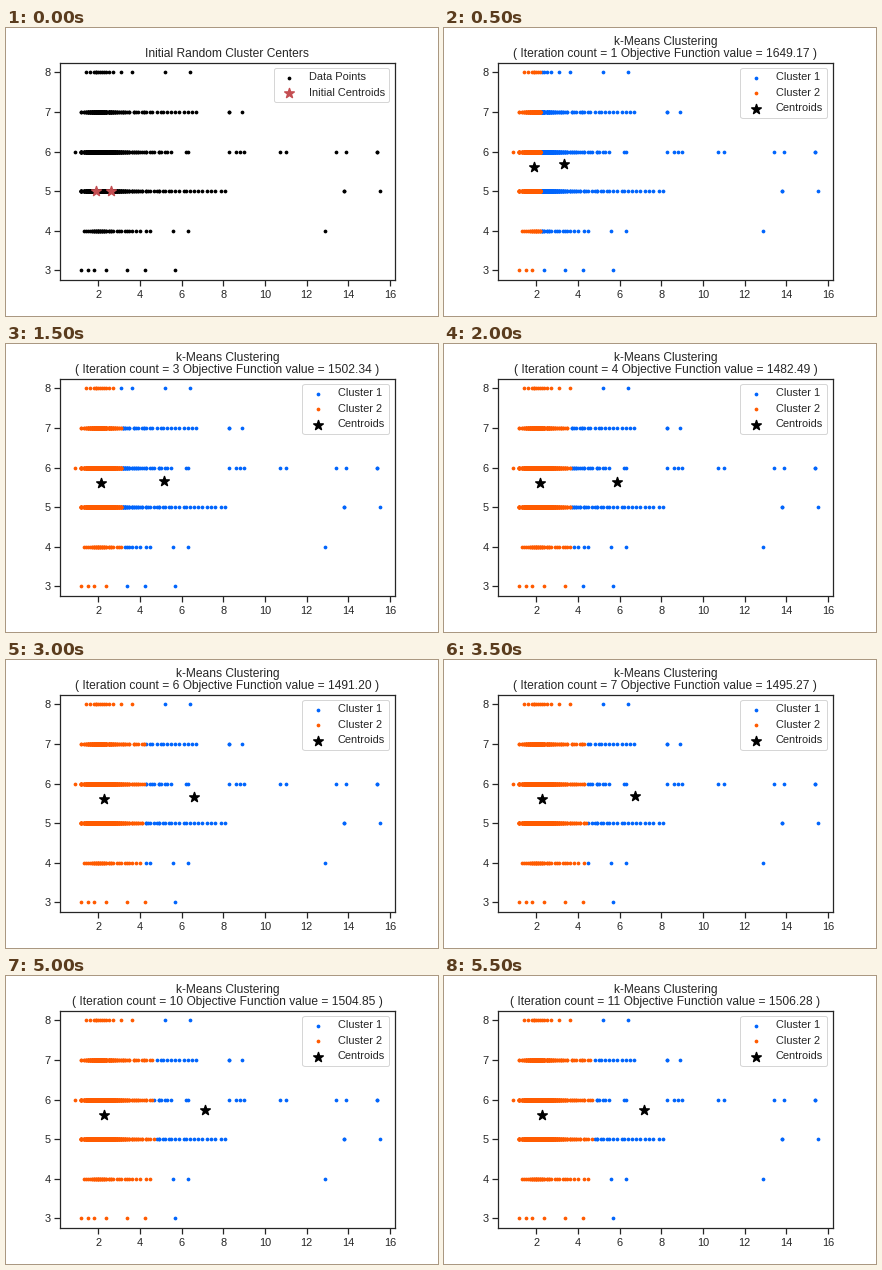
Write a matplotlib script that moves like this. It is 432 by 288 pixels and loops after 6000 ms.

```python
import matplotlib.pyplot as plt
import numpy as np
from matplotlib.animation import FuncAnimation

INK = "0.15"
BLUE, ORANGE, RED = "#0165fc", "#ff5b00", "#c44e52"
ITERATIONS = 11

plt.rcParams.update({
    "font.family": "Liberation Sans", "font.size": 12,
    "text.color": INK, "axes.edgecolor": INK, "axes.linewidth": 1.25,
    "xtick.color": INK, "ytick.color": INK,
    "xtick.labelsize": 11, "ytick.labelsize": 11,
    "xtick.major.size": 6, "ytick.major.size": 6,
    "xtick.major.width": 1.25, "ytick.major.width": 1.25,
    "axes.titlesize": 12, "legend.fontsize": 11,
})


def row(y, core, tail, reach, outliers):
    """Points at height y: a log-logistic core, a thinning tail, outliers."""
    u = (np.arange(core) + 0.5) / core
    dense = np.maximum(2.1 * (u / (1 - u)) ** 0.12, 1.2)
    sparse = np.geomspace(3.1, reach, tail)
    x = np.concatenate([np.round(dense, 1), np.round(sparse, 1), outliers])
    return np.column_stack([x, np.full(len(x), y)])


POINTS = np.vstack([
    row(3, 2, 0, 4, [1.2, 1.5, 3.4, 4.25, 5.7]),
    row(4, 35, 8, 4.5, [5.6, 6.3, 12.9]),
    row(5, 620, 34, 8.1, [13.8, 13.8, 15.5]),
    row(6, 580, 20, 5.5, [0.9, 6.2, 6.3, 8.3, 8.6, 8.8, 9.0,
                          10.7, 11.0, 13.4, 13.9, 15.4, 15.4]),
    row(7, 170, 24, 6.7, [8.3, 8.3, 8.9]),
    row(8, 13, 0, 4, [3.6, 5.2, 6.4]),
])

# Key iterations; the steps between them are interpolated.
KEYS = [0, 1, 3, 4, 6, 9, 11]
CENTER_X = [2.60, 3.35, 5.15, 5.88, 6.60, 7.08, 7.17]
CENTER_Y = [5.00, 5.68, 5.66, 5.64, 5.66, 5.74, 5.74]
OBJECTIVE = [1649.17, 1502.34, 1482.49, 1491.20, 1503.41, 1506.28]


def centroids(n):
    """Centers of cluster 1 and cluster 2 after n iterations."""
    right = np.interp(n, KEYS, CENTER_X), np.interp(n, KEYS, CENTER_Y)
    left = 2.305 - 0.405 * 0.645 ** max(n - 1, 0), 5.62 if n else 5
    return np.array([right, left])


fig, ax = plt.subplots(figsize=(6, 4), dpi=72)
fig.subplots_adjust(left=0.125, right=0.9, bottom=0.125, top=0.88)


def dots(points, color, label):
    ax.scatter(*points.T, s=5, color=color, linewidth=1.5, label=label)


def stars(centers, color, label):
    ax.scatter(*centers.T, s=100, marker="*", color=color,
               linewidth=1.5, label=label)


def draw(n):
    ax.clear()
    ax.set(xlim=(0.17, 16.23), ylim=(2.75, 8.25),
           xticks=range(2, 17, 2), yticks=range(3, 9))
    if n == 0:
        dots(POINTS, "black", "Data Points")
        stars(centroids(n), RED, "Initial Centroids")
        title = "Initial Random Cluster Centers"
    else:
        # Points are assigned to the centroids of the previous iteration.
        offsets = POINTS[:, None] - centroids(n - 1)
        nearest = np.linalg.norm(offsets, axis=2).argmin(axis=1)
        dots(POINTS[nearest == 0], BLUE, "Cluster 1")
        dots(POINTS[nearest == 1], ORANGE, "Cluster 2")
        stars(centroids(n), "black", "Centroids")
        objective = np.interp(n, KEYS[1:], OBJECTIVE)
        title = (f"k-Means Clustering\n( Iteration count = {n} "
                 f"Objective Function value = {objective:.2f} )")
    ax.set_title(title, linespacing=1.0)
    ax.legend(loc="upper right")


animation = FuncAnimation(fig, draw, frames=ITERATIONS + 1,
                          init_func=lambda: None, interval=500,
                          repeat=True, repeat_delay=0)
plt.show()
```
